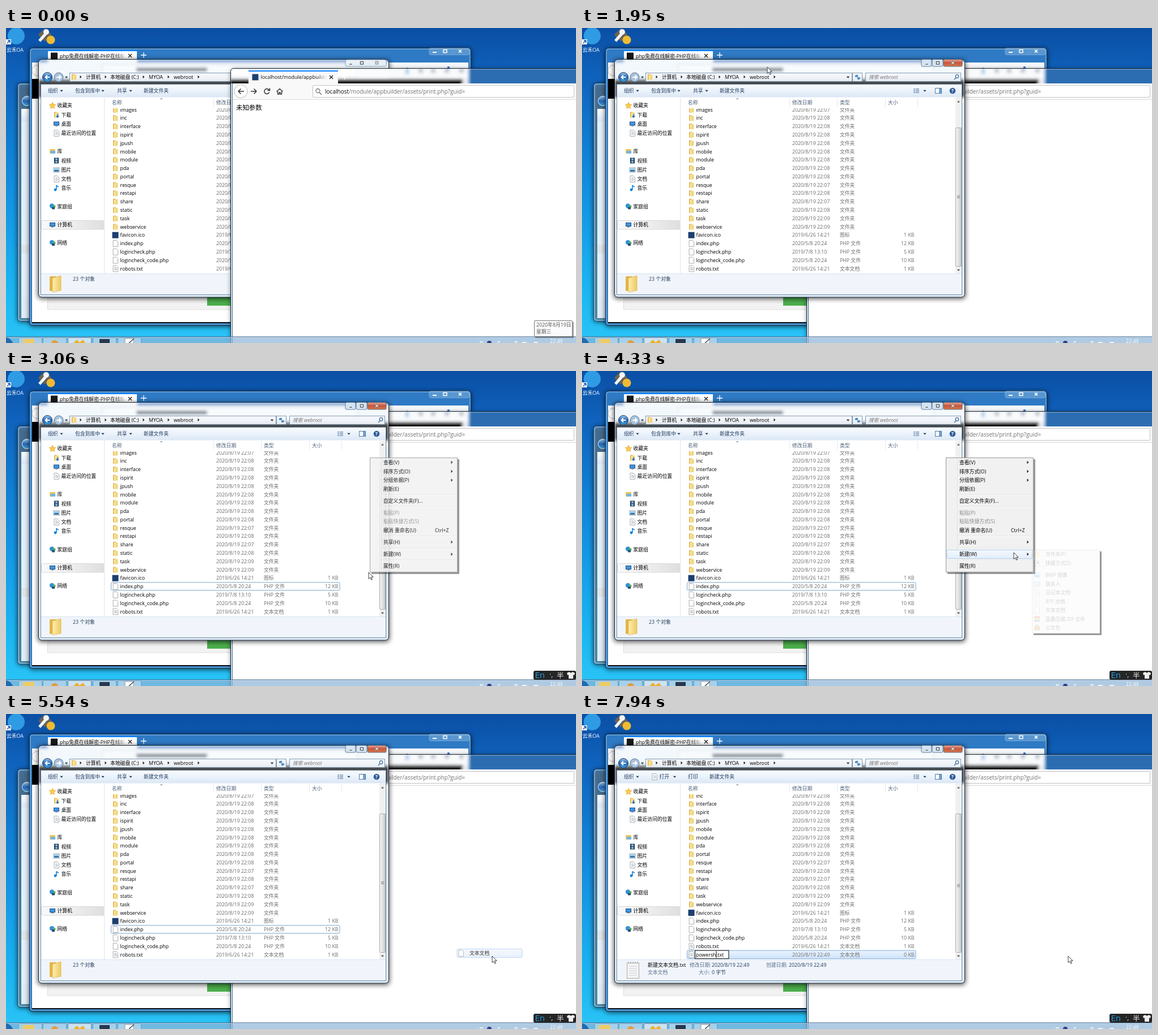
An HTML page that plays this animation: 1006x557 px, repeating every 8000 ms.

```html
<!DOCTYPE html>
<html lang="zh">
<head>
<meta charset="utf-8">
<title>Desktop</title>
<style>
html, body { margin: 0; width: 100%; height: 100%; overflow: hidden; background: #1b70b8; }
svg { display: block; width: 100vw; height: 100vh; }
text { font-family: 'Open Sans', 'Noto Sans CJK SC', 'Noto Sans CJK', sans-serif; white-space: pre; }
</style>
</head>
<body>
<svg id="stage" viewBox="0 0 1006 557" xmlns="http://www.w3.org/2000/svg"></svg>
<script>
const LOOP = 8000, ROW = 14.79;
const $ = id => document.getElementById(id);

// Drawing helpers; text is centred on y.
const rect = (x, y, w, h, fill, more = '') => `<rect x="${x}" y="${y}" width="${w}" height="${h}" fill="${fill}" ${more}/>`;
const text = (x, y, s, fill = '#000', size = 8.8, more = '') =>
  `<text x="${x}" y="${y + size * .36}" fill="${fill}" font-size="${size}" ${more}>${s}</text>`;
const path = (d, stroke, w = 1, fill = 'none', more = '') => `<path d="${d}" fill="${fill}" stroke="${stroke}" stroke-width="${w}" ${more}/>`;
const disc = (x, y, r, fill, more = '') => `<circle cx="${x}" cy="${y}" r="${r}" fill="${fill}" ${more}/>`;
const group = (id, body, more = '') => `<g id="${id}" ${more}>${body}</g>`;
const right = (x, y, c = '#222') => path(`M${x - 1.5} ${y - 2.7}l3 2.7l-3 2.7z`, 'none', 0, c);
const down = (x, y, c = '#1e395b') => path(`M${x - 2.7} ${y - 1.3}h5.4l-2.7 3z`, 'none', 0, c);
const grad = (id, stops, dir = 'x2="0" y2="1"') =>
  `<linearGradient id="${id}" ${dir}>${stops.map(([o, c]) => `<stop offset="${o}" stop-color="${c}"/>`).join('')}</linearGradient>`;
const shadow = (x, y, w, h, o = .65) => rect(x, y, w, h, '#000', `rx="6" opacity="${o}" filter="url(#blur)"`);
const cross = (x, y, r, c, w = 1.4) => path(`M${x - r} ${y - r}l${2 * r} ${2 * r}m0 ${-2 * r}l${-2 * r} ${2 * r}`, c, w);
const plus = (x, y, c) => path(`M${x - 5} ${y}h10m-5-5v10`, c, 1.3);

// Frosted glass: the windows behind, blurred within a clip
const frost = clip => `<g clip-path="url(#${clip})"><use href="#back" filter="url(#frost)"/></g>`;

// Small icons, centred on x, y
const icons = {
  folder: (x, y) => rect(x - 4, y - 5, 5, 10, '#dfae3e', 'rx="1"') + rect(x - 2.5, y - 4, 6.5, 9, 'url(#folder)', 'rx="1"'),
  page: (x, y) => path(`M${x - 4} ${y - 5.5}h6l2.5 2.5v8.5h-8.5z`, '#999', .8, '#fdfdfd'),
  lines: (x, y) => icons.page(x, y) + path(`M${x - 2} ${y - 2}h4m-4 2h5m-5 2h5`, '#8aa3bd', .8),
  badge: (x, y) => rect(x - 5.5, y - 5.5, 11, 11, '#1d3f70'),
  star: (x, y) => path(`M${x} ${y - 5.5}l1.7 3.6 4 .5-3 2.7.8 4-3.5-2-3.5 2 .8-4-3-2.7 4-.5z`, '#d99a1c', .7, '#ffcc45'),
  load: (x, y) => icons.folder(x, y) + path(`M${x + 2} ${y - 1}v5m-2.3-2l2.3 2.3 2.3-2.3`, '#1a74d0', 1.6),
  screen: (x, y) => rect(x - 5, y - 4, 10, 7, '#1c4f8c') + rect(x - 4, y - 3, 8, 5, '#3f95de') + rect(x - 2, y + 3, 4, 1.6, '#889'),
  library: (x, y) => rect(x - 5, y - 4, 10, 8, '#eec65c', 'rx="1"') + rect(x - 3, y - 1, 8, 5, '#6eb5e6'),
  film: (x, y) => rect(x - 4, y - 5, 8, 10, '#243a55') + rect(x - 2, y - 4, 4, 3.5, '#76b8e8') + rect(x - 2, y + .5, 4, 3.5, '#76b8e8'),
  photo: (x, y) => rect(x - 5, y - 4, 10, 8, '#fff', 'stroke="#789" stroke-width=".8"') + rect(x - 4, y, 8, 3, '#3178ae') + rect(x - 4, y - 3, 8, 3, '#9fd2f3'),
  note: (x, y) => path(`M${x} ${y + 3}v-8q1 2 4 3`, '#1782d8', 1.6) + disc(x - 2, y + 3, 2.4, '#1782d8'),
  globe: (x, y) => disc(x - 1, y - 1, 4, '#3390d2') + disc(x + 3, y, 2.5, '#57b466') + rect(x - 1, y + 1, 5, 4, '#24507e'),
  link: (x, y) => rect(x - 4.5, y - 4.5, 9, 9, '#fff', 'stroke="#888" stroke-width=".8"') + path(`M${x - 2} ${y + 2}l4-4m-3 0h3v3`, '#173e80', 1.4),
  card: (x, y) => rect(x - 5, y - 3.5, 10, 8, '#e8f3fd', 'stroke="#4d86bd"') + path(`M${x - 3} ${y}h3m1 0h3m-7 2h6`, '#4d86bd'),
  books: (x, y) => [['#d64e3c', -5], ['#e3b536', -1.7], ['#3a7fc4', 1.6]].map(([c, d]) => rect(x - 5, y + d, 10, 3.3, c)).join(''),
  bag: (x, y) => rect(x - 5, y - 3, 10, 7.5, '#b76a22', 'rx="1"') + path(`M${x - 2} ${y - 3}v-2h4v2`, '#87480f') + rect(x - 1, y, 2, 2, '#f5d070')
};
const icon = (kind, x, y) => icons[kind](x, y);

const defs = `<defs>
${grad('sky', [[0, '#0b4fa5'], [.15, '#0f62bb'], [.5, '#138edf'], [.85, '#1bb8f3'], [1, '#2bc4f6']])}
${grad('folder', [[0, '#fdeeb0'], [1, '#efc95f']], 'x2="1" y2="0"')}
${grad('bar', [[0, '#fafcff'], [.5, '#eaf2fb'], [1, '#dbe7f5']])}
${grad('red', [[0, '#e5a596'], [.5, '#c9553a'], [1, '#d57a50']])}
${grad('orb', [[0, '#9cc8f0'], [.5, '#2765b0'], [1, '#3fa4e6']])}
${grad('pick', [[0, '#eaf3fe'], [1, '#cfe3fb']])}
${grad('hover', [[0, '#f4f8fd'], [1, '#e3eefb']])}
${grad('thumb', [[0, '#f5f5f5'], [.5, '#e2e2e2'], [1, '#c8c8c8']], 'x2="1" y2="0"')}
${grad('fade', [[0, '#fff'], [.85, '#fff'], [1, '#000']], 'x2="1" y2="0"')}
<filter id="blur" x="-10%" y="-10%" width="120%" height="120%"><feGaussianBlur stdDeviation="4"/></filter>
<filter id="soft" x="-10%" y="-100%" width="120%" height="300%"><feGaussianBlur stdDeviation="3"/></filter>
<filter id="frost" filterUnits="userSpaceOnUse" x="45" y="45" width="790" height="95"><feGaussianBlur stdDeviation="2.5"/></filter>
<clipPath id="frostA"><rect x="57" y="55" width="619" height="78" rx="6"/></clipPath>
<clipPath id="frostB"><rect x="397" y="72" width="424" height="27"/></clipPath>
<clipPath id="listClip"><rect x="175" y="142" width="484" height="292"/></clipPath>
<mask id="tabA"><rect x="90" y="40" width="121" height="20" fill="url(#fade)"/></mask>
<mask id="tabB"><rect x="445" y="77" width="121" height="20" fill="url(#fade)"/></mask>
</defs>`;

function desktop() {
  return rect(0, 0, 1006, 557, 'url(#sky)') +
    disc(18, 14, 15, '#2f9be4') +
    rect(0, 20, 9, 9, '#fff') + path('M2 27l5-5m-4 0h4v4', '#174f9b', 1.4) +
    text(1, 38.5, '云禾OA', '#fff') +
    rect(60, 3, 17, 17, '#6b6257', 'rx="2" transform="rotate(45 68 12)"') +
    path('M59 23L71 9', '#f4f4f4', 5) + disc(71, 7, 5, '#f4f4f4') + disc(79, 21, 7.5, '#f0bb33');
}

function backWindows() {
  const rear = rect(20.5, 97.5, 380, 421, '#a5d2f5', 'rx="5" fill-opacity=".4" stroke="#17446f"') +
    rect(22, 99, 377, 418, 'none', 'rx="4" stroke="#d7ecfb" opacity=".7"') +
    disc(37, 129, 8.5, 'url(#orb)', 'stroke="#dceefb"') +
    rect(27, 143, 370, 22, 'url(#bar)') + rect(27, 165, 370, 311, '#e3f0fb') +
    rect(27, 383, 15, 16, '#dfe5ea') + rect(27, 476, 370, 37, '#e0ecf8');
  const tools = [732, 754, 778, 804].map(x => path(`M${x - 4} 72h8m-8 3h8m-8 3h8`, '#445')).join('');
  return shadow(20, 98, 380, 422) + rear + shadow(41, 36, 780, 492) +
    rect(41.5, 35.5, 779, 490, '#2f7ac4', 'rx="5" stroke="#12304f"') +
    rect(43, 37, 776, 487, 'none', 'rx="4" stroke="#8fc2ea"') +
    rect(74, 39, 157, 23, '#fff') + rect(74, 39, 157, 2, '#0a84ff') +
    rect(79, 43.5, 12, 12, '#16181b') +
    text(95, 49.5, 'php免费在线解密-PHP在线解密', '#111', 8.8, 'mask="url(#tabA)"') +
    cross(219, 49, 3, '#222') + plus(243, 48, '#fff') +
    rect(747, 35.5, 71, 12, '#a9cdeb', 'rx="3" opacity=".35" stroke="#e6f3fd"') +
    path('M753 43h7', '#fff', 2) + rect(772, 38.5, 6, 5, 'none', 'stroke="#fff" stroke-width="1.5"') + cross(801.5, 41, 2.4, '#fff', 1.5) +
    rect(46, 61, 770, 29, '#f8fafc') + disc(55, 75, 9, '#fff', 'stroke="#bbb"') +
    rect(170, 64, 450, 22, '#fff', 'stroke="#ccc"') + rect(230, 70, 125, 7, '#4d5863') + tools +
    path('M708 70v7m-3-3l3 3 3-3m-7 6h8', '#2f83d6', 1.5) + disc(781, 70, 2.3, '#2f83d6') +
    rect(46, 90, 760, 35, '#000') + rect(46, 125, 770, 397, '#fff') + rect(806, 90, 10, 35, '#e6edf3') +
    rect(73.5, 470, 400, 28, '#f2f2f2', 'stroke="#ddd"') + rect(355, 470, 90, 21, '#4cae4c') +
    rect(46, 520, 770, 2, '#0d1117');
}

function browser() {
  const url = 'localhost<tspan fill="#737373">/module/appbuilder/assets/print.php?guid=</tspan>';
  return shadow(397, 73, 630, 500, .5) + rect(396.5, 71.5, 640, 500, '#1a61ab', 'rx="5"') + frost('frostB') +
    rect(400, 73, 276, 14, '#fff', 'opacity=".55" filter="url(#soft)"') +
    rect(396.5, 71.5, 640, 500, '#fff', 'rx="5" fill-opacity=".08" stroke="#16222f"') +
    rect(398, 73, 640, 500, 'none', 'rx="4" stroke="#d7e9f8" opacity=".5"') +
    rect(397, 98, 2, 460, '#d3e4f3') + rect(399, 98, 1, 460, '#4f6f8f') +
    rect(428, 76, 158, 23, '#f9f9fa') + rect(428, 75, 158, 2, '#0a84ff') + icon('badge', 440, 87) +
    text(449.5, 87.2, 'localhost/module/appbuilder/', '#0c0c0d', 8.9, 'mask="url(#tabB)"') +
    cross(574, 87, 3, '#222') + plus(597.5, 86, '#fff') +
    rect(400, 98, 606, 28, '#f9f9fa') + rect(400, 126, 606, 431, '#fff') + rect(400, 126, 606, .8, '#d2d2d4') +
    disc(414.5, 112, 11.5, '#fff', 'stroke="#bbb"') +
    path('M420 112h-10m4.5-4.5l-4.5 4.5 4.5 4.5M432 112h10m-4.5-4.5l4.5 4.5-4.5 4.5', '#333', 1.5) +
    path('M464.5 110a4.5 4.5 0 1 0 .2 3.5M465.5 106.5v4h-4', '#333', 1.5) +
    path('M477.5 112.5l5.5-5 5.5 5M479.5 112v5h2.5v-3h2v3h2.5v-5', '#333', 1.4) +
    rect(541.5, 101.5, 461, 21, '#fff', 'rx="1.5" stroke="#c4c4c6"') +
    disc(550.5, 111, 3.5, 'none', 'stroke="#777" stroke-width="1.3"') + path('M553 114l4 4', '#777', 1.5) +
    text(563, 112, url, '#0c0c0d', 10.06) + text(406, 141, '未知参数', '#000', 11.4);
}

const files = (() => {
  const dirs = 'images inc interface ispirit jpush mobile module pda portal resque restapi share static task webservice'.split(' ');
  const minute = { images: 7, resque: 7, share: 7, task: 9, webservice: 9 };
  return [
    ...dirs.map(n => ['folder', n, `2020/8/19 22:0${minute[n] || 8}`, '文件夹', '']),
    ['badge', 'favicon.ico', '2019/6/26 14:21', '图标', '1 KB'],
    ['page', 'index.php', '2020/5/8 20:24', 'PHP 文件', '12 KB'],
    ['page', 'logincheck.php', '2019/7/8 13:10', 'PHP 文件', '5 KB'],
    ['page', 'logincheck_code.php', '2020/5/8 20:24', 'PHP 文件', '10 KB'],
    ['lines', 'robots.txt', '2019/6/26 14:21', '文本文档', '1 KB']
  ];
})();

const fileRow = ([kind, name, date, type, size], y) => icon(kind, 193, y) + text(201.5, y, name) +
  text(371, y, date, '#6d6d6d') + text(455, y, type, '#6d6d6d') + text(586.5, y, size, '#6d6d6d', 8.8, 'text-anchor="end"');

function fileList() {
  const rowY = i => 144.4 + i * ROW, last = rowY(20);
  const edit = rect(199.5, last - 7.3, 76, 14.5, '#fff', 'id="editBox" stroke="#000"') +
    rect(201, last - 6, 51.5, 12, '#3399ff', 'id="editPick"') +
    text(201, last, '', '#fff', 8.8, 'id="editName"') + text(253, last, '.txt', '#000', 8.8, 'id="editExt"') +
    rect(252, last - 6, 1, 12, '#000', 'id="caret"');
  const fresh = rect(185.5, last - 7.3, 403.5, 14.5, 'url(#pick)', 'rx="2" stroke="#84acdd"') +
    fileRow(['lines', '', '2020/8/19 22:49', '文本文档', '0 KB'], last) +
    text(201.5, last, '新建文本文档.txt', '#000', 8.8, 'id="plainName"') + group('edit', edit);
  return group('list',
    rect(185.5, rowY(16) - 7.2, 403.5, 14, '#fff', 'id="focus" rx="2" stroke="#7da2ce"') +
    files.map((f, i) => fileRow(f, rowY(i))).join('') + group('fresh', fresh));
}

function sidebar() {
  const items = [
    ['star', '收藏夹', 137], ['load', '下载', 153.5, 1], ['screen', '桌面', 169.5, 1], ['lines', '最近访问的位置', 186, 1],
    ['library', '库', 218], ['film', '视频', 234.5, 1], ['photo', '图片', 251, 1], ['lines', '文档', 267, 1], ['note', '音乐', 283, 1],
    ['globe', '家庭组', 315.5], ['screen', '计算机', 348], ['globe', '网络', 380]
  ];
  return rect(62.5, 340.5, 111, 15.5, 'url(#thumb)', 'rx="2" stroke="#d8d8d8" fill-opacity=".6"') +
    items.map(([k, s, y, sub = 0]) => icon(k, 82 + 7 * sub, y) + text(90.5 + 7 * sub, y, s)).join('') +
    rect(173, 123, 1, 311, '#dde5ee');
}

function explorer() {
  const navy = '#1e395b', head = '#4c607a', label = '#5a6f8c';
  const crumbs = [['计算机', 141], ['本地磁盘 (C:)', 184], ['MYOA', 252], ['webroot', 296]];
  const buttons = [['#d3e3f2', 599, 18], ['#d3e3f2', 618, 19], ['url(#red)', 638, 33]];
  const controls = group('lively', buttons.map(([c, x, w]) => rect(x, 55.5, w, 12.5, c, 'rx="2" stroke="#4c6680" stroke-width=".8"')).join('')) +
    group('idle', rect(599, 56, 72, 12, '#e6f0f9', 'rx="3" stroke="#7e9ab5" stroke-width=".8"')) +
    path('M605.5 64h6', '#fff', 3) + path('M606 64h5', '#555', 1.4) +
    rect(625.5, 59.5, 5, 4.5, '#fff', 'stroke="#555" stroke-width="1.3"') + cross(654.5, 61.5, 2.5, '#555', 2.6) + cross(654.5, 61.5, 2.4, '#fff', 1.3);
  const toolsA = [['包含到库中', 122, 171], ['共享', 196, 220], ['新建文件夹', 243]];
  const toolsB = [['打开', 136.5, 163.5], ['打印', 187], ['新建文件夹', 225]];
  const tools = set => set.map(([s, x, a]) => text(x, 111, s, navy) + (a ? down(a, 111) : '')).join('');
  const columns = [['名称', 187, 366], ['修改日期', 371, 450], ['类型', 455, 535], ['大小', 540, 592]];
  const detailsA = rect(77, 439, 12, 26, '#e2b548', 'rx="1"') + path('M82 442l15-4v26l-15 3z', '#d5ab48', .6, 'url(#folder)') +
    text(118, 444, '23 个对象', navy);
  const detailsB = rect(79.5, 440.5, 21, 27, '#f4f4f2', 'stroke="#aaa"') + path('M82 440v-2m4 2v-2m4 2v-2m4 2v-2m4 2v-2', '#888') +
    path('M83 446h14m-14 4h14m-14 4h14m-14 4h14m-14 4h14', '#ccd3da') +
    text(116, 443.5, '新建文本文档.txt', '#000', 9) + text(190, 443.5, '修改日期:', label) + text(229, 443.5, '2020/8/19 22:49', navy) +
    text(325, 443.5, '创建日期:', label) + text(365, 443.5, '2020/8/19 22:49', navy) +
    text(116, 457, '文本文档', label) + text(206, 457, '大小:', label) + text(229, 457, '0 字节', navy);
  const field = (x, w) => rect(x, 79.5, w, 15, '#f2f6fb', 'fill-opacity=".9" stroke="#6d87a1" stroke-width=".8"');
  return shadow(56, 56, 621, 423) + rect(57.5, 55.5, 618, 420.5, '#d3e3f2', 'rx="6"') + frost('frostA') +
    rect(57.5, 55.5, 618, 420.5, '#e4f0fb', 'rx="6" fill-opacity=".3" stroke="#1a2836"') +
    rect(59, 57, 615, 417.5, 'none', 'rx="5" stroke="#eef6fd" opacity=".8"') +
    controls +
    disc(93, 87, 8, '#a9c3db', 'stroke="#5f7d9a"') + disc(73, 87, 8.5, 'url(#orb)', 'stroke="#1c3f6c"') +
    path('M77.5 87h-8m3.5-3.5l-3.5 3.5 3.5 3.5M89 87h8m-3.5-3.5l3.5 3.5-3.5 3.5', '#fff', 1.9) + down(106.5, 87) +
    field(112.5, 364) + field(477.5, 17) + field(500.5, 168) +
    icon('folder', 120, 86.5) + [132, 176, 243, 287, 340].map(x => right(x, 86.5)).join('') +
    crumbs.map(([s, x]) => text(x, 86.5, s)).join('') + down(469.5, 87, '#222') +
    path('M482 86q2-4 5-1m-1-2v3h-3m8 2q-2 4-5 1m1 2v-3h3', '#2872b8', 1.3) +
    text(506, 86.5, '搜索 webroot', '#777', 8.8, 'font-style="italic"') +
    disc(662, 85.5, 2.8, 'none', 'stroke="#3c6da3" stroke-width="1.2"') + path('M660 88l-3 3', '#3c6da3', 1.5) +
    rect(61.5, 99.5, 609, 372, '#fff', 'stroke="#5d7a95" stroke-width=".8"') + rect(62, 100, 608, 22.5, 'url(#bar)') +
    text(74, 111, '组织', navy) + down(98, 111) + group('toolsA', tools(toolsA)) + group('toolsB', icon('lines', 128, 111) + tools(toolsB)) +
    path('M585 108h3m1 0h6m-10 3h3m1 0h6m-10 3h3m1 0h6', '#6c8bb0', 1.4) + down(605, 111) +
    rect(623.5, 106.5, 11, 9, '#fff', 'stroke="#56779c"') + rect(630, 107, 4, 8, '#6aa5dc') +
    disc(654, 111, 5.3, '#2e5b98') + text(651.8, 111, '?', '#fff', 9, 'font-weight="bold"') +
    sidebar() + columns.map(([s, x, d]) => text(x, 132, s, head) + rect(d, 124, 1, 15, '#e3e8ee')).join('') +
    path('M271.5 126l2.7-2.5 2.7 2.5z', 'none', 0, '#8aa9c4') +
    `<g clip-path="url(#listClip)">${fileList()}</g>` +
    rect(659, 123, 11, 311, '#f0f0f0') + path('M662 131.5l2.5-3 2.5 3z', 'none', 0, '#555') + down(664.5, 428, '#555') +
    rect(659.5, 176.5, 10, 245, 'url(#thumb)', 'id="thumb" rx="1" stroke="#999" stroke-width=".8"') +
    path('M662 296.5h5m-5 2h5m-5 2h5', '#777', .8, 'none', 'id="grip"') +
    rect(62, 434, 608, 37, '#f1f5fb') + rect(62, 434, 608, 1, '#d6e2ef') +
    group('detailsA', detailsA) + group('detailsB', detailsB);
}

const edge = (x, y, w, h) => path(`M${x + w} ${y + 3}h3v${h}h${-w}v-3h${w - 3}z`, 'none', 0, '#000', 'opacity=".4"');
const frame = (x, y, w, h) => rect(x + .5, y + .5, w - 1, h - 1, '#f1f1f1', 'stroke="#979797"');
const rule = (x, y, w) => rect(x, y, w, 1, '#e0e0e0') + rect(x, y + 1, w, 1, '#fff');
const hover = (id, x, y, w) => rect(x, y - 7.5, w, 15, 'url(#hover)', `id="${id}" rx="2" stroke="#aecff7"`);

function contextMenu() {
  const items = [['查看(V)', 161.5, 1], ['排序方式(O)', 177.5, 1], ['分组依据(P)', 193, 1], ['刷新(E)', 208.5], ['自定义文件夹(F)...', 229.5],
    ['粘贴(P)', 250.5, 0, 1], ['粘贴快捷方式(S)', 266, 0, 1], ['撤消 重命名(U)', 281.5], ['共享(H)', 302.5, 1], ['新建(W)', 324, 1], ['属性(R)', 345]];
  return frame(642, 153, 155, 203) + rect(662, 155, 1, 199, '#e2e3e3') +
    [218.5, 239.5, 291.5, 313, 334].map(y => rule(663, y, 131)).join('') + hover('menuHover', 644, 324, 151) +
    items.map(([s, y, sub, off]) => text(666, y, s, off ? '#8b8b8b' : '#000') + (sub ? right(787, y) : '')).join('') + text(757, 281.5, 'Ctrl+Z');
}

const newItems = [['folder', '文件夹(F)', 324], ['link', '快捷方式(S)', 340], ['photo', 'BMP 图像', 361], ['card', '联系人', 376.5], ['lines', '日记本文档', 392],
  ['lines', 'RTF 文档', 407.5], ['page', '文本文档', 423], ['books', '蓝叠压缩 ZIP 文件', 438.5], ['bag', '公文包', 454]];
const subMenu = () => frame(794, 316, 120, 148) + rect(813, 318, 1, 144, '#e2e3e3') + rule(814, 350, 98) +
  hover('subHover', 796, 0, 115) + newItems.map(([k, s, y]) => icon(k, 803, y) + text(818, y, s)).join('');

function taskbar() {
  const tiles = [22, 65, 109, 153, 197];
  return rect(0, 546, 1006, 11, '#8db4d8', 'opacity=".7"') + rect(0, 545.5, 1006, 1, '#2b5274') + rect(0, 546.5, 1006, 1, '#d5e6f5', 'opacity=".7"') +
    disc(-2, 562, 15, '#1f6bb0') +
    tiles.map((x, i) => rect(x + .5, 547.5, 41, 14, '#dcebf7', `rx="2" stroke="#50779b" stroke-width=".8" opacity="${i === 2 ? .85 : .5}"`)).join('') +
    rect(30, 550, 20, 9, '#efcb65') + disc(86, 558, 6, '#e69a3a') + path('M119 557l6-6 5 5 6-5 4 6z', 'none', 0, '#f0b02c') +
    rect(165, 550, 18, 9, '#27384d') + rect(210, 549, 15, 10, '#fff', 'stroke="#999"') + path('M217 557l9-8', '#456', 1.6) +
    path('M836 555h6m55 0h6m8 1h8m12 0h8', '#fff', 1.3) + disc(853, 557, 4, '#2b3f8c') + path('M868 557l2-3 2 1', '#fff', 1.3) +
    text(960, 553.5, '22:49', '#fff');
}

const tooltip = rect(934, 520, 68, 28, '#000', 'opacity=".35"') + rect(932.5, 517.5, 67, 28, '#fbfbfd', 'rx="1.5" stroke="#767676"') +
  text(936, 525, '2020年8月19日', '#575757', 8.8) + text(936, 537, '星期三', '#575757', 8.8);
const ime = rect(931, 530, 75, 16, '#252525', 'rx="3"') + text(933.5, 538, 'En', '#1e9be8', 15) + text(959, 537, '·,', '#ddd', 12) +
  text(972, 538, '半', '#eee', 12.5) + path('M990 534l4-2q3 3 6 0l4 2-1 4-2-1v7h-8v-7l-2 1z', 'none', 0, '#eee');

$('stage').innerHTML = defs + desktop() + group('back', backWindows()) + group('explorer', explorer()) + group('browser', browser()) +
  group('taskbar', taskbar()) + group('tip', tooltip) + group('ime', ime) +
  group('menuEdge', edge(642, 153, 155, 203)) + group('menu', contextMenu()) +
  group('subEdge', edge(794, 316, 120, 148)) + group('sub', subMenu()) +
  group('picked', hover('pickedBox', 796, 423, 115) + icon('page', 803, 423) + text(818, 423, '文本文档')) +
  path('M0 0v11.5l2.7-2.5 2 4.3 1.8-.8-2-4.2h3.7z', '#111', .8, '#fff', 'id="cursor"');

const route = [[500, 880, 557], [1270, 314, 70], [1320, 314, 70], [1370, 321, 70], [1530, 321, 70], [1550, 327, 69], [1960, 327, 69],
  [2490, 645, 355], [2600, 645, 355], [2620, 640, 356], [3060, 640, 356], [3220, 619, 363], [3630, 762, 321], [4400, 762, 321],
  [4650, 830, 326], [4950, 861, 410], [5130, 858, 428]];
const typing = [[6530, 'p'], [6750, 'po'], [7160, 'pow'], [7400, 'powe'], [7580, 'power'], [7790, 'powers'], [7940, 'powersh']];

const ramp = (t, a, b) => Math.min(1, Math.max(0, (t - a) / (b - a)));
const show = (id, o) => {
  $(id).style.display = o > 0 ? '' : 'none';
  $(id).style.opacity = +o;
};
const set = (id, attrs) => Object.entries(attrs).forEach(([k, v]) => $(id).setAttribute(k, v));

function pointer(t) {
  const i = route.findIndex(p => t < p[0]);
  if (i < 1) return (i ? route[route.length - 1] : route[0]).slice(1);
  const [a, x, y] = route[i - 1], [b, u, v] = route[i];
  const k = ramp(t, a, b), e = k * k * (3 - 2 * k);
  return [x + (u - x) * e, y + (v - y) * e];
}

function rename(t) {
  const step = typing.filter(s => t >= s[0]).pop();
  $('editName').textContent = step ? step[1] : '新建文本文档';
  set('editName', { fill: step ? '#000' : '#fff' });
  const w = step ? $('editName').getComputedTextLength() : 51.5;
  set('editExt', { x: 201 + w + .5 });
  set('editBox', { width: step ? w + 24 : 76 });
  set('caret', { x: 201 + w });
  show('editPick', !step);
  show('caret', step || t < 6130 ? 1 : 0);
}

let raised = null;
function draw(t) {
  const front = t >= 1790, made = t >= 5650, editing = t >= 5760;
  if (front !== raised) {
    raised = front;
    $('stage').insertBefore($(front ? 'explorer' : 'browser'), $('taskbar'));
  }
  show('lively', front);
  show('idle', !front);
  show('tip', 1 - ramp(t, 1310, 1370));
  show('ime', t >= 2000);
  show('focus', t >= 2460 && !made);
  show('fresh', made);
  show('edit', editing);
  show('plainName', !editing);
  show('toolsA', !made);
  show('toolsB', made);
  show('detailsA', !made);
  show('detailsB', made);
  set('list', { transform: `translate(0 ${made ? -ROW : 0})` });
  set('thumb', { y: made ? 187.5 : 176.5, height: made ? 234 : 245 });
  set('grip', { transform: `translate(0 ${made ? 5 : 0})` });

  const open = t < 5500, [x, y] = pointer(t);
  show('menuEdge', open && t >= 2890);
  show('menu', open && ramp(t, 2890, 3090));
  show('menuHover', t < 3900 ? .5 * ramp(t, 3540, 3600) : .5 + .5 * ramp(t, 3890, 3930));
  show('subEdge', open && t >= 4330);
  show('sub', open && t >= 4330 && ramp(t, 4300, 4500));
  const over = newItems.findIndex(item => Math.abs(item[2] - y) < 8);
  const row = t < 5180 ? Math.min(over, 5) : 6;
  show('subHover', t > 4550 && x > 796 && row >= 0);
  if (row >= 0) set('subHover', { y: newItems[row][2] - 7.5 });
  show('picked', open ? 0 : 1 - ramp(t, 5500, 5720));
  rename(t);
  set('cursor', { transform: `translate(${x} ${y})` });
  show('cursor', t >= 500);
}

const begin = performance.now();
(function tick() {
  draw((performance.now() - begin) % LOOP);
  requestAnimationFrame(tick);
})();
</script>
</body>
</html>
```
